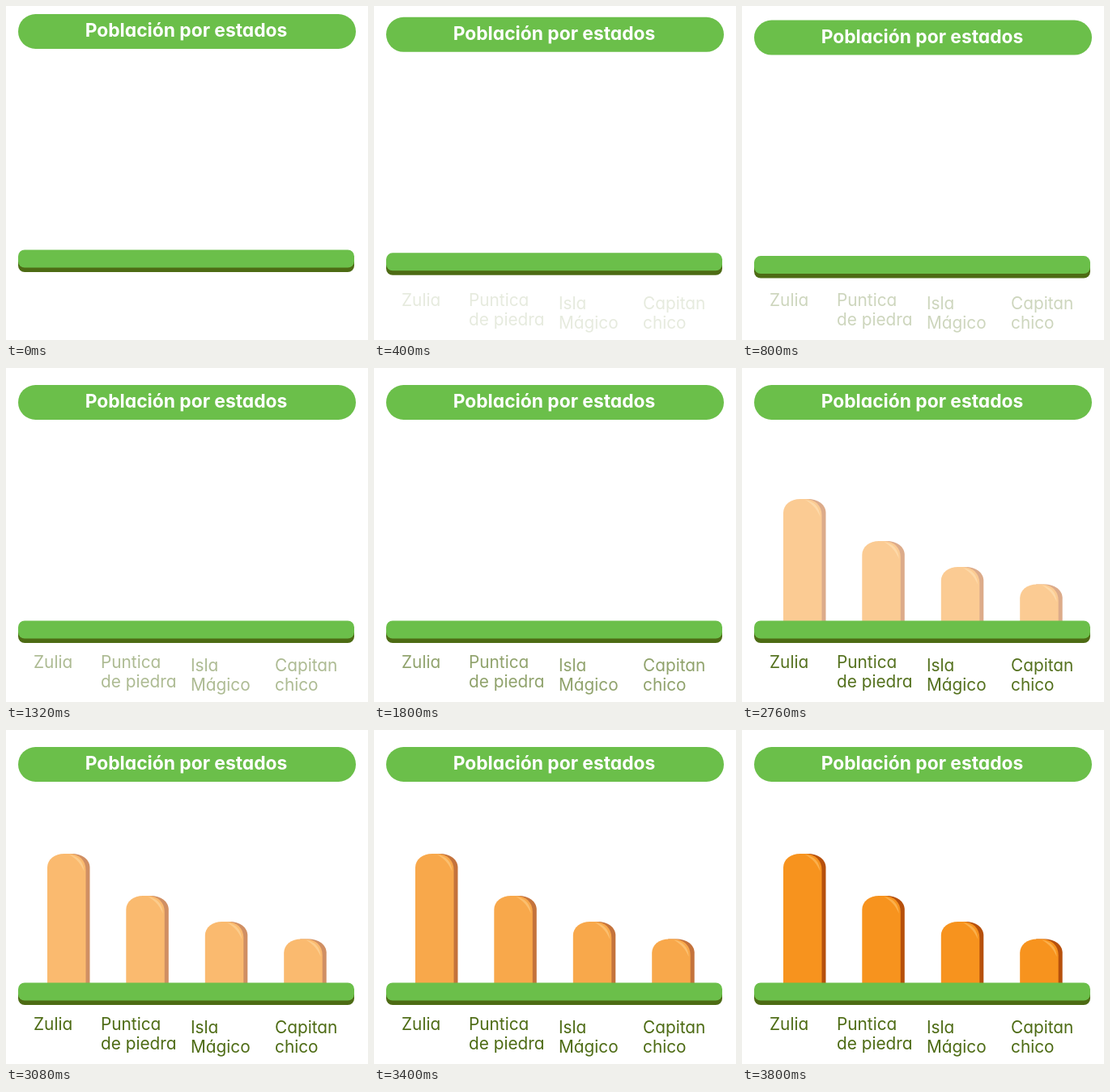
Animation of 447x413 px, one loop 4960 ms. Source, as an HTML page:

```html
<!DOCTYPE html>
<html lang="es">
<head>
<meta charset="utf-8">
<title>Población por estados</title>
<style>
  html, body { margin: 0; width: 100%; height: 100%; overflow: hidden; background: #fff; }
  svg { display: block; width: 447px; height: 413px; }
  text { font-family: Inter, "Open Sans", sans-serif; font-feature-settings: "cv11"; }
  .title { font-size: 22.8px; font-weight: 700; fill: #fff; text-anchor: middle; }
  #labels { font-size: 20.8px; fill: #4d6b14; }
  .green { fill: #6bbf4a; }
  .olive { fill: #4d6b14; }
  .side { fill: #b6500c; }
  .front { fill: #f7931e; }
  .shine { fill: #fbb04c; }
</style>
</head>
<body>
<svg viewBox="0 0 447 413">
  <g id="bars"></g>
  <g id="board">
    <rect class="green" x="15" y="21" width="417" height="43" rx="21.5"/>
    <text class="title" x="222.5" y="49">Población por estados</text>
    <rect class="olive" x="15" y="317" width="415" height="23" rx="8"/>
    <rect class="green" x="15" y="312.5" width="415" height="22" rx="8"/>
  </g>
  <g id="labels"></g>
</svg>
<script>
const LOOP = 4960, STEP = 40;
const $ = id => document.getElementById(id);
const bars = $('bars'), board = $('board'), labels = $('labels');

// left edge and top of each column
const columns = [[51, 153], [148.3, 205], [245.8, 237], [343.2, 258.5]];
// x, first baseline, lines
const names = [
  [34, 370.5, 'Zulia'],
  [117, 370.5, 'Puntica', 'de piedra'],
  [228, 375.3, 'Isla', 'Mágico'],
  [332, 375.3, 'Capitan', 'chico']
];

const column = ([x, y]) => {
  const h = 316 - y;
  return `<g transform="translate(${x} ${y})">
    <path class="side" d="M20 0H30C43 0 52.5 7 52.5 17V${h}H20Z"/>
    <path class="front" d="M0 ${h}V17C0 7 9 0 21 0H27C39 0 47.5 8 47.5 20V${h}Z"/>
    <path class="shine" d="M27 1C38 3 45 10 45.5 22C42 13 36 6 27 1Z"/>
  </g>`;
};

bars.innerHTML = columns.map(column).join('');
labels.innerHTML = names.map(([x, y, ...lines]) =>
  lines.map((s, i) => `<text x="${x}" y="${y + 24 * i}">${s}</text>`).join('')).join('');

const ramp = (t, from, to) => Math.min(1, Math.max(0, (t - from) / (to - from)));

function draw(now) {
  const t = Math.min(3800, Math.floor((now % LOOP) / STEP) * STEP);
  const drop = -11 * (1 - ramp(t, 0, 1160));
  const rise = 81 * (1 - ramp(t, 1800, 2880));
  board.setAttribute('transform', `translate(0 ${drop})`);
  bars.setAttribute('transform', `translate(0 ${rise})`);
  bars.setAttribute('opacity', ramp(t, 1800, 3800));
  labels.setAttribute('opacity', ramp(t, 0, 2880));
}

const start = performance.now();
function tick() {
  draw(performance.now() - start);
  requestAnimationFrame(tick);
}
draw(0);
requestAnimationFrame(tick);
</script>
</body>
</html>
```
